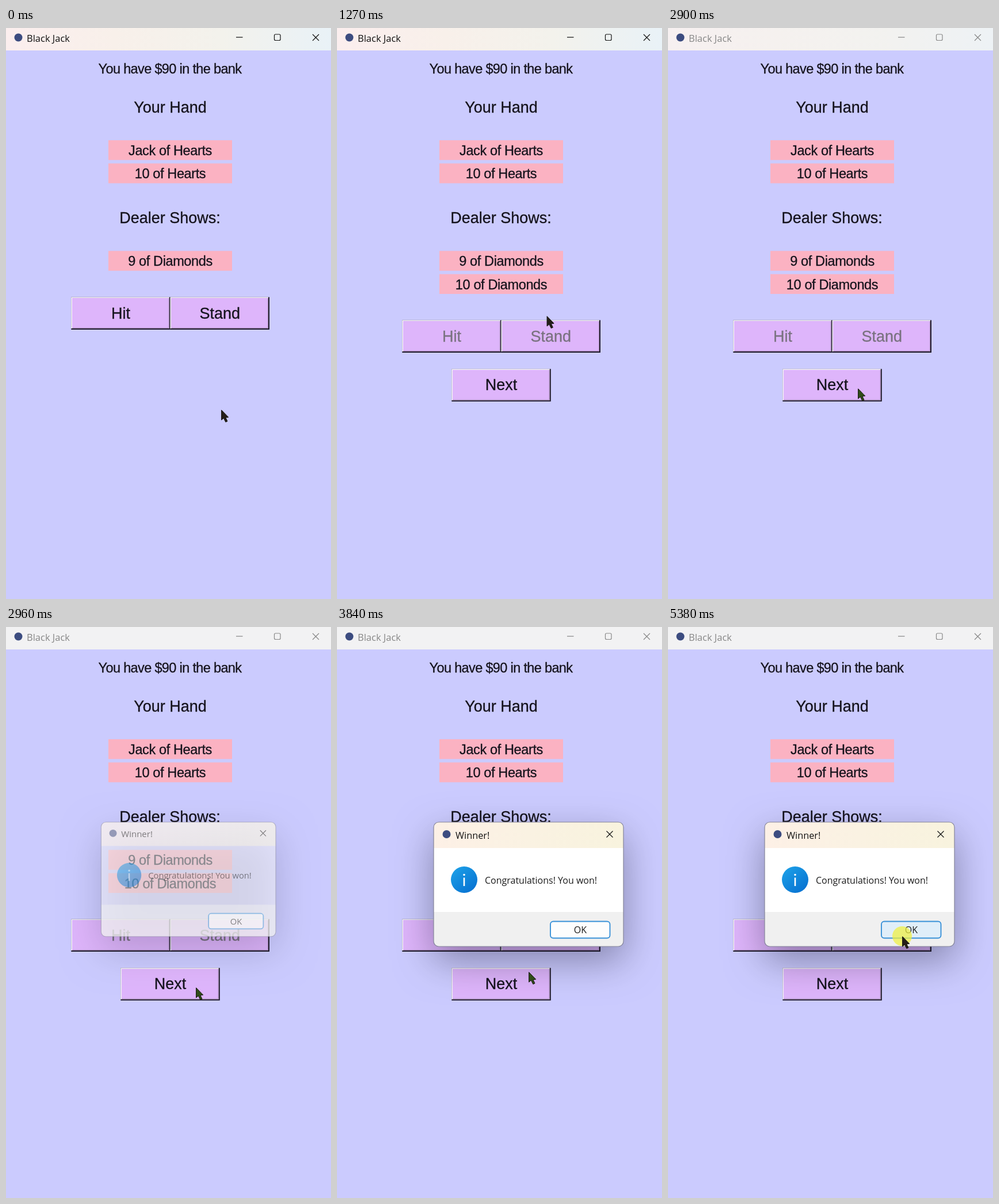
Recreate the animation shown at these times as an HTML page with a canvas. Size 565 by 992 pixels, loop 5450 ms.

```html
<!DOCTYPE html>
<html lang="en">
<head>
<meta charset="utf-8">
<title>Black Jack</title>
<style>
  html, body { margin: 0; width: 100%; height: 100%; overflow: hidden; background: #cbcbfe; }
  canvas { display: block; width: 565px; height: 992px; }
</style>
</head>
<body>
<canvas id="stage" width="565" height="992"></canvas>
<script>
const ctx = document.getElementById('stage').getContext('2d');
const LOOP = 5450;
const TICKS = 81;
const LEAD = 12;

const GAME = '"Liberation Sans", Arial, sans-serif';
const SYSTEM = '"Open Sans", "Noto Sans", sans-serif';
const INK = '#15131c';
const BADGE = '#3c4c80';
const ARROW = new Path2D('M.6 .8V18l3.8-3.2 3.4 6.8 3.1-1.4-3-6.4 4.7-.6z');

const STAND_DOWN = 17, STAND_UP = 19;
const NEXT_DOWN = 42, NEXT_UP = 43;
const DIALOG_IN = 44, OK_HOVER = 78, OK_DOWN = 80;

// Pointer moves between resting places; bow bends the path sideways
const HOME = { x: 374, y: 663 };
const MOVES = [
  { start: 2, end: 11, x: 364.5, y: 500, bow: 6 },
  { start: 25, end: 33, x: 334, y: 647, bow: 0 },
  { start: 34, end: 40, x: 330, y: 626, bow: 0 },
  { start: 56, end: 66.5, x: 347, y: 368, bow: 4 },
  { start: 72, end: 80, x: 407, y: 537, bow: 36 }
];

const within = (tick, from, to) => tick >= from && tick < to;
const ease = k => Math.sin(Math.PI / 2 * k ** 1.15);

function pointerAt(tick) {
  let { x, y } = HOME;
  for (const move of MOVES) {
    if (tick <= move.start) break;
    const k = ease(Math.min(1, (tick - move.start) / (move.end - move.start)));
    x += (move.x - x) * k + move.bow * Math.sin(Math.PI * k);
    y += (move.y - y) * k;
  }
  return { x, y };
}

function rect(x, y, w, h, fill) {
  ctx.fillStyle = fill;
  ctx.fillRect(x, y, w, h);
}

function disc(x, y, r, fill) {
  ctx.fillStyle = fill;
  ctx.beginPath();
  ctx.arc(x, y, r, 0, Math.PI * 2);
  ctx.fill();
}

function roundBox(x, y, w, h, r, stroke, width = 1.2) {
  ctx.beginPath();
  ctx.roundRect(x, y, w, h, r);
  ctx.strokeStyle = stroke;
  ctx.lineWidth = width;
  ctx.stroke();
}

function systemText(str, x, y, size, fill, align = 'left') {
  ctx.font = `${size}px ${SYSTEM}`;
  ctx.letterSpacing = '0px';
  ctx.textAlign = align;
  ctx.fillStyle = fill;
  ctx.fillText(str, x, y);
}

// Game labels are slightly heavier than the plain face
function gameText(str, x, y, size, tracking = 0, fill = INK) {
  ctx.font = `${size}px ${GAME}`;
  ctx.letterSpacing = `${tracking}px`;
  ctx.textAlign = 'center';
  ctx.fillStyle = ctx.strokeStyle = fill;
  ctx.lineWidth = 0.3;
  ctx.fillText(str, x, y);
  ctx.strokeText(str, x, y);
}

function fade(x0, y0, x1, y1, ...colors) {
  const g = ctx.createLinearGradient(x0, y0, x1, y1);
  colors.forEach((c, i) => g.addColorStop(i / (colors.length - 1), c));
  return g;
}

function closeMark(x, y, color) {
  const r = 5.5;
  ctx.strokeStyle = color;
  ctx.lineWidth = 1.2;
  ctx.beginPath();
  ctx.moveTo(x - r, y - r);
  ctx.lineTo(x + r, y + r);
  ctx.moveTo(x + r, y - r);
  ctx.lineTo(x - r, y + r);
  ctx.stroke();
}

function titleBar(tick) {
  const color = tick < NEXT_UP ? '#111' : '#878787';
  rect(0, 0, 565, 39, '#f2f2f3');
  ctx.globalAlpha = Math.min(1, Math.max(0, (DIALOG_IN - tick) / 2));
  rect(0, 0, 565, 39, fade(0, 0, 565, 0, '#fbeeee', '#f8f0ea', '#f3f2ec', '#e9f2f7'));
  ctx.globalAlpha = 1;
  disc(21.5, 16.5, 7, BADGE);
  systemText('Black Jack', 36, 23.5, 16.5, color);
  rect(400, 15.5, 11.5, 1.2, color);
  roundBox(466.5, 11, 10.5, 10.5, 2, color);
  closeMark(538.5, 16.5, color);
}

function cards(top, labels) {
  labels.forEach((label, i) => {
    const y = top + i * 40.3;
    rect(178, y, 215, 34.4, '#fbb2c2');
    gameText(label, 285.5, y + 26, 23.5, -0.38);
  });
}

function button(label, x, y, { pressed = false, disabled = false } = {}) {
  const w = 172.5, h = 56.5, shift = pressed ? 1.5 : 0;
  const dark = '#211c2b', light = '#fbf8ff';
  rect(x, y, w, h, pressed ? light : dark);
  rect(x, y, w - 2, h - 2, pressed ? dark : light);
  rect(x + 1.7, y + 1.7, w - 3.7, h - 3.7, '#a88abd');
  rect(x + 1.7 + shift, y + 1.7 + shift, w - 5, h - 5, '#deb5fb');
  gameText(label, x + w / 2 + shift, y + 37 + shift, 27, 0, disabled ? '#79727f' : INK);
}

function table(tick) {
  const over = tick >= STAND_UP;
  const dealer = ['9 of Diamonds', '10 of Diamonds'];
  rect(0, 39, 565, 953, '#cbcbfe');
  gameText('You have $90 in the bank', 285, 79, 23.5, -0.65);
  gameText('Your Hand', 285.5, 146.5, 27);
  cards(195, ['Jack of Hearts', '10 of Hearts']);
  gameText('Dealer Shows:', 285, 338.5, 27);
  cards(387.3, over ? dealer : dealer.slice(0, 1));

  const y = over ? 507.5 : 467.5;
  button('Hit', 113.3, y, { disabled: over });
  button('Stand', 285.5, y, { disabled: over, pressed: within(tick, STAND_DOWN, STAND_UP) });
  if (over) button('Next', 199.3, 592.3, { pressed: within(tick, NEXT_DOWN, NEXT_UP) });
}

function dialog(tick) {
  if (tick < DIALOG_IN) return;
  const x = 168, y = 339, w = 330, h = 216, r = 9;
  const age = tick - DIALOG_IN;
  const size = 1 - 0.08 * Math.exp(-age);
  ctx.save();
  ctx.globalAlpha = Math.min(1, (age + 1) / 2);
  ctx.translate(135, y);
  ctx.scale(size, size);
  ctx.translate(-135, -y);

  ctx.save();
  ctx.beginPath();
  ctx.roundRect(x, y, w, h, r);
  ctx.shadowColor = 'rgba(0, 0, 20, 0.36)';
  ctx.shadowBlur = 66;
  ctx.shadowOffsetY = 24;
  ctx.fillStyle = '#fff';
  ctx.fill();
  ctx.shadowColor = 'transparent';
  ctx.clip();
  rect(x, y, w, 45, fade(x, 0, x + w, 0, '#fdf0e6', '#faf2e2', '#f8f3de'));
  rect(x, 495, w, 60, '#f0f0f0');
  ctx.restore();
  roundBox(x, y, w, h, r, '#85859a');

  disc(190.5, 360, 7, BADGE);
  systemText('Winner!', 206, 367.5, 16.3, '#111');
  closeMark(474, 360, '#111');

  disc(221, 439, 23, fade(205, 420, 237, 458, '#1b9de6', '#0873d2'));
  disc(221, 430.5, 1.8, '#fff');
  rect(219.7, 435.5, 2.6, 14.5, '#fff');
  systemText('Congratulations! You won!', 257, 446, 16, '#1c1c1c');

  rect(372, 512, 102, 28, tick >= OK_HOVER ? '#e0eef9' : '#fdfdfd');
  roundBox(371, 511.5, 103.5, 29, 5, '#3991d8', 1.9);
  systemText('OK', 423, 532, 16, '#1c1c1c', 'center');
  ctx.restore();
}

function pointer(tick) {
  const { x, y } = pointerAt(tick);
  const clicking = within(tick, STAND_DOWN, STAND_UP) ||
    within(tick, NEXT_DOWN, NEXT_UP) || tick >= OK_DOWN;
  if (clicking) disc(x, y, 17, 'rgba(240, 240, 64, 0.72)');

  ctx.save();
  ctx.translate(x, y);
  ctx.fillStyle = within(tick, NEXT_UP, 66) ? '#304c18' : '#251e18';
  ctx.fill(ARROW);
  ctx.strokeStyle = '#14140f';
  ctx.lineWidth = 1;
  ctx.stroke(ARROW);
  ctx.restore();
}

function draw() {
  const time = performance.now() % LOOP;
  const tick = Math.min(TICKS - 1, Math.floor((time + LEAD) / LOOP * TICKS));
  table(tick);
  titleBar(tick);
  dialog(tick);
  pointer(tick);
  requestAnimationFrame(draw);
}
draw();
</script>
</body>
</html>
```
